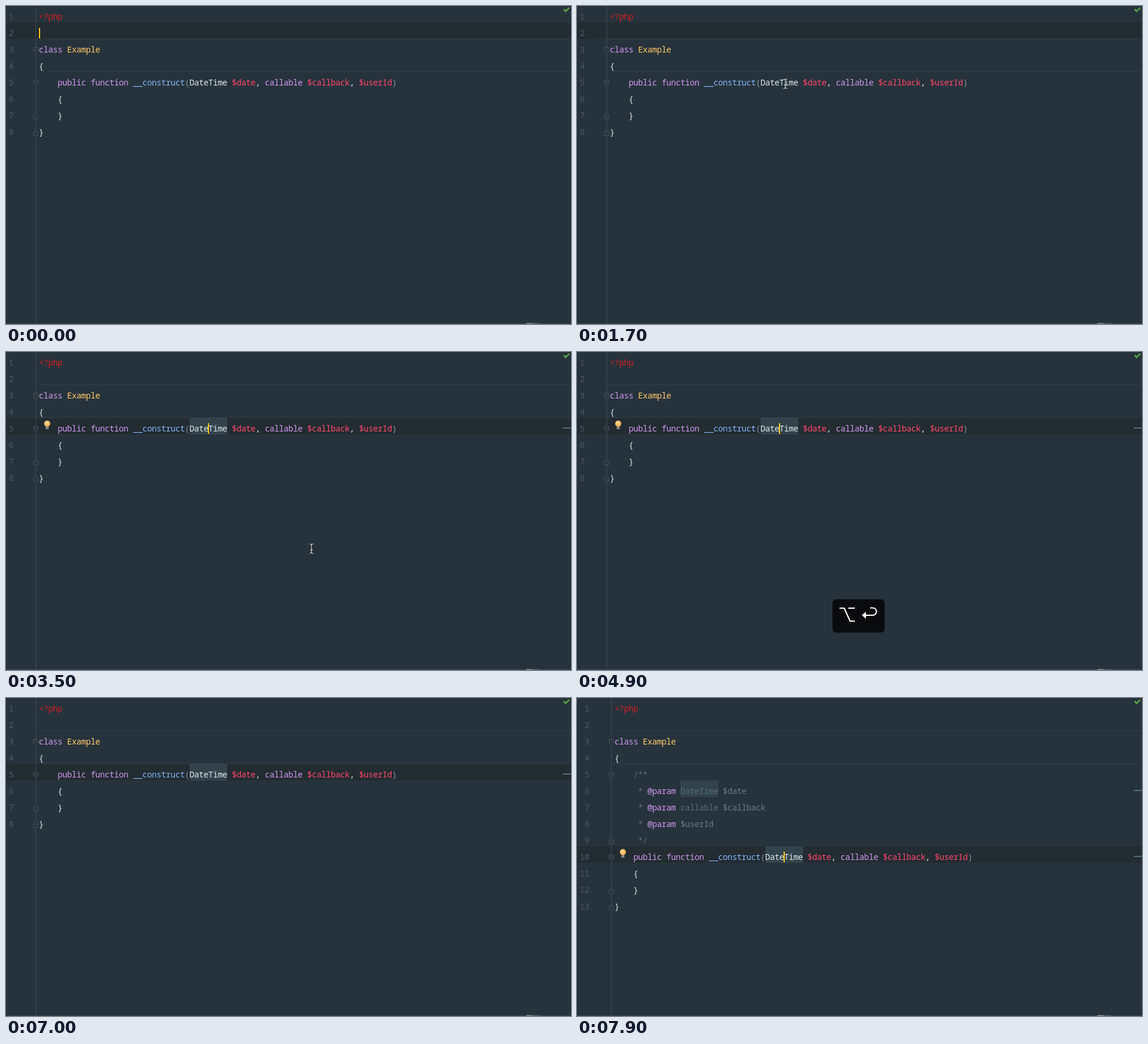
Write an HTML page with a canvas that moves like this. It is 960 px wide and 540 px high and loops after 8000 ms.

```html
<!DOCTYPE html>
<html lang="en">
<head>
<meta charset="utf-8">
<title>Editor</title>
<style>
  html, body { margin: 0; width: 100%; height: 100%; overflow: hidden; background: #27333c; }
  canvas { display: block; }
</style>
</head>
<body>
<canvas id="stage" width="960" height="540"></canvas>
<script>
const ctx = document.getElementById('stage').getContext('2d');
const LOOP = 8000, STEP = 100, CELL = 8, ROW = 28;
const FONT = '14px "Noto Sans Mono", "DejaVu Sans Mono", monospace';

const C = {
  bg: '#27333c', band: '#222c31', rule: '#333f47', gutter: '#414c53',
  num: '#475b65', tag: '#d11f22', key: '#d197f0', cls: '#ffcb6b',
  text: '#dfe8ea', fn: '#82b5fb', arg: '#ff4769', paren: '#7d949e',
  note: '#566d77', noteVar: '#637a85', mark: '#32434c', caret: '#ffc61a'
};

const signature = [
  ['    public function ', 'key'], ['__construct', 'fn'], ['(', 'paren'],
  ['DateTime ', 'text'], ['$date', 'arg'], [', ', 'text'], ['callable ', 'key'],
  ['$callback', 'arg'], [', ', 'text'], ['$userId', 'arg'], [')', 'paren']
];
const head = [
  [['<?php', 'tag']], [], [['class ', 'key'], ['Example', 'cls']], [['{', 'text']]
];
const body = [signature, [['    {', 'text']], [['    }', 'text']], [['}', 'text']]];
const param = (kind, name) =>
  [['     * ', 'note'], ['@param ', 'key'], [kind, 'note'], [name, 'noteVar']];
const docs = [
  [['    /**', 'note']], param('DateTime ', '$date'), param('callable ', '$callback'),
  param('', '$userId'), [['     */', 'note']]
];
const plain = [...head, ...body];
const documented = [...head, ...docs, ...body];

const within = (t, a, b) => t >= a && t < b;
const clamp = v => Math.max(0, Math.min(1, v));
const smooth = v => { v = clamp(v); return v * v * (3 - 2 * v); };
const mix = (a, b, p) => a + (b - a) * p;
const rowY = n => (n - 1) * ROW;

function rect(color, x, y, w, h) {
  ctx.fillStyle = color;
  ctx.fillRect(x, y, w, h);
}

function line(color, width, points, close) {
  ctx.beginPath();
  points.forEach(([x, y]) => ctx.lineTo(x, y));
  if (close) ctx.closePath();
  ctx.strokeStyle = color;
  ctx.lineWidth = width;
  ctx.stroke();
}

// One glyph per cell keeps the code on its grid.
function type(str, x, n, color) {
  ctx.fillStyle = color;
  for (const ch of str) {
    if (ch !== ' ') ctx.fillText(ch, x + CELL / 2, rowY(n) + 23);
    x += CELL;
  }
  return x;
}

function fold(x, n, dir) {
  const y = rowY(n) + 19;
  const shape = [[-4, -4.5], [4, -4.5], [4, 1.5], [0, 5], [-4, 1.5]]
    .map(([px, py]) => [x + px, y + py * dir]);
  ctx.beginPath();
  shape.forEach(([px, py]) => ctx.lineTo(px, py));
  ctx.fillStyle = C.bg;
  ctx.fill();
  line('#47535a', 1, shape, true);
  line('#47535a', 1, [[x - 2, y - .5], [x + 2, y - .5]]);
}

function bulb(x, y) {
  rect('#9b9c98', x - 2.5, y + 5, 5, 4.5);
  rect('#5d6467', x - 2.5, y + 6.5, 5, 1);
  const glow = ctx.createRadialGradient(x - 1, y - 2, .5, x, y, 6);
  glow.addColorStop(0, '#ffdc9a');
  glow.addColorStop(1, '#f2a540');
  ctx.fillStyle = glow;
  ctx.beginPath();
  ctx.arc(x, y, 5.2, 0, Math.PI * 2);
  ctx.fill();
}

function pointer(x, y) {
  ctx.save();
  ctx.translate(x, y);
  for (const [color, width] of [['#12181b', 3], ['#e8ecee', 1.2]]) {
    line(color, width, [[-3.5, -8], [-1.5, -8], [0, -6.5], [1.5, -8], [3.5, -8]]);
    line(color, width, [[0, -6.5], [0, 6.5]]);
    line(color, width, [[-3.5, 8], [-1.5, 8], [0, 6.5], [1.5, 8], [3.5, 8]]);
    line(color, width, [[-2, 2], [2, 2]]);
  }
  ctx.restore();
}

function shortcut(alpha) {
  ctx.save();
  ctx.globalAlpha = alpha;
  ctx.fillStyle = '#0a0b0c';
  ctx.beginPath();
  ctx.roundRect(434, 420, 88.5, 56.5, 6);
  ctx.fill();
  line('#fff', 2.2, [[446, 435], [454, 435], [464, 457], [472, 457]]);
  line('#fff', 2.2, [[461, 435], [472, 435]]);
  ctx.beginPath();
  ctx.moveTo(490, 447);
  ctx.lineTo(502, 447);
  ctx.bezierCurveTo(511, 447, 511, 434.5, 502, 434.5);
  ctx.lineTo(498, 434.5);
  ctx.stroke();
  ctx.beginPath();
  ctx.moveTo(484, 447);
  ctx.lineTo(491, 441);
  ctx.lineTo(491, 453);
  ctx.fillStyle = '#fff';
  ctx.fill();
  ctx.restore();
}

function pointerAt(t) {
  if (t < 1800) {
    const p = t < 1000 ? .55 * smooth((t - 50) / 650) : mix(.55, 1, smooth((t - 950) / 750));
    return [mix(946, 354, p), mix(276, 132, p)];
  }
  const p = smooth((t - 2350) / 800);
  return [mix(354, 519, p), mix(132, 334, p)];
}

function caretOn(t) {
  if (t < 2100) return t < 500 || within(t, 1000, 1500) || t >= 2000;
  return within(t, 2100, 3000) || within(t, 3500, 4000) || within(t, 4500, 5000) || t >= 7900;
}

function draw(t) {
  const done = t >= 7100, settled = t >= 7400, clicked = t >= 2100;
  const lines = done ? documented : plain;
  const dx = done ? CELL : 0, left = 56 + dx, edge = 50 + dx;
  const method = done ? 10 : 5, active = clicked ? method : 2;

  rect(C.bg, 0, 0, 960, 540);
  rect(C.band, 0, rowY(active), 960, ROW);
  rect(C.rule, edge, 55, 960, 1);
  rect(C.rule, edge, 111, 960, 1);
  rect(C.gutter, edge, 0, 1, 540);

  if (t >= 2400) {
    rect(C.mark, left + 32 * CELL, rowY(method), 64, ROW);
    rect('#506d7a', 946, rowY(method) + 16, 14, 2);
  }
  if (settled) {
    rect(C.mark, left + 14 * CELL, rowY(6), 64, ROW);
    rect('#506d7a', 946, rowY(6) + 16, 14, 2);
  }

  ctx.font = FONT;
  ctx.textAlign = 'center';
  lines.forEach((parts, i) => {
    const label = String(i + 1);
    type(label, 13 + dx - label.length * CELL, i + 1, C.num);
    let x = left;
    for (const [str, color] of parts) x = type(str, x, i + 1, C[color]);
  });

  const last = lines.length;
  fold(edge + .5, 3, 1);
  fold(edge + .5, method, 1);
  fold(edge + .5, last - 1, -1);
  fold(edge + .5, last, -1);
  if (settled) {
    fold(edge + .5, 5, 1);
    fold(edge + .5, 9, -1);
  }

  if (caretOn(t)) {
    const x = clicked ? left + 36 * CELL - 1 : left;
    rect(C.caret, x, rowY(active) + 9, 2, 18);
  }
  if (within(t, 3100, 5000) || t >= 7900) bulb(70 + dx, rowY(method) + 9.5);
  if (!within(t, 7100, 7400)) line('#55a247', 2.6, [[947.5, 5.5], [951, 9], [957, 3]]);

  rect('#3e4a51', 0, 539, 960, 1);
  rect('#89908f', 884, 538.5, 11, 1.5);
  rect('#56626a', 895, 538.5, 12, 1.5);

  if (within(t, 100, 4600)) pointer(...pointerAt(t));
  const shown = Math.min(clamp((t - 4500) / 300), clamp((6200 - t) / 400));
  if (shown > 0) shortcut(shown);
}

function frame() {
  draw(Math.floor(performance.now() % LOOP / STEP) * STEP);
  requestAnimationFrame(frame);
}
frame();
</script>
</body>
</html>
```
